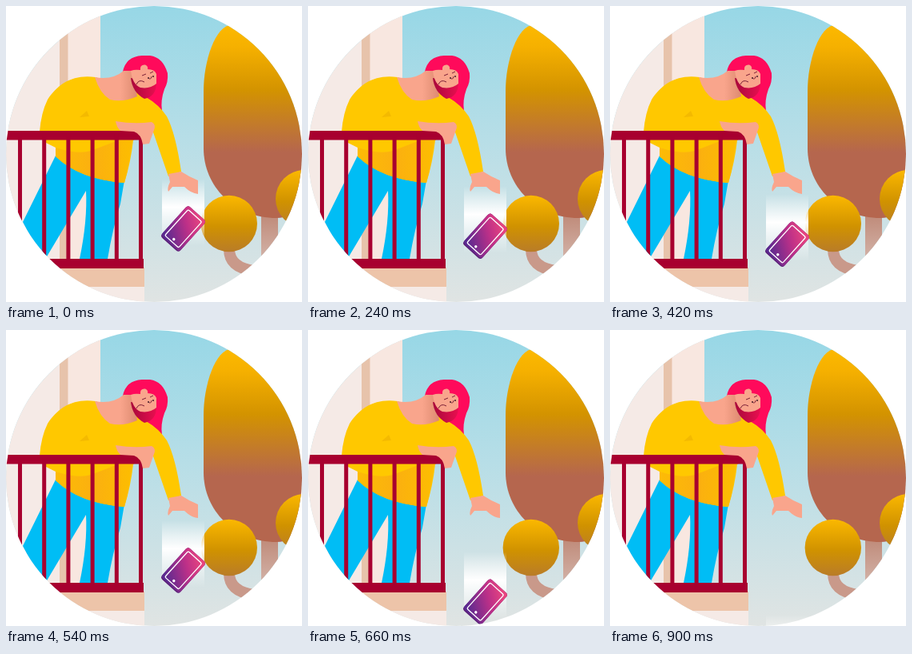
An HTML page for the animation above (2.25 s loop, 370 by 370 pixels).

```html
<!DOCTYPE html>
<html lang="en">
<head>
<meta charset="utf-8">
<title>Dropped phone</title>
<style>
html, body { margin: 0; width: 100%; height: 100%; overflow: hidden; background: #fff; }
svg { display: block; width: 100vw; height: 100vh; }
</style>
</head>
<body>
<svg viewBox="0 0 370 370">
  <defs>
    <clipPath id="disc"><circle cx="185" cy="185" r="185"/></clipPath>
    <linearGradient id="sky" x2="0" y2="1">
      <stop stop-color="#97d7e6"/><stop offset=".45" stop-color="#b7dee7"/><stop offset="1" stop-color="#e0e4e3"/>
    </linearGradient>
    <linearGradient id="crown" x2="0" y2="1">
      <stop stop-color="#fdb900"/><stop offset=".12" stop-color="#f5b000"/><stop offset=".34" stop-color="#d39300"/><stop offset=".66" stop-color="#b5664e"/>
    </linearGradient>
    <linearGradient id="bush" x2="0" y2="1">
      <stop stop-color="#fbb800"/><stop offset=".55" stop-color="#d09200"/><stop offset="1" stop-color="#b97c28"/>
    </linearGradient>
    <linearGradient id="trunk" x2="0" y2="1">
      <stop stop-color="#bd8674"/><stop offset="1" stop-color="#d8bdb4"/>
    </linearGradient>
    <linearGradient id="trail" x2="0" y2="1">
      <stop stop-color="#fff" stop-opacity="0"/><stop offset=".42" stop-color="#fff"/><stop offset="1" stop-color="#fff" stop-opacity="0"/>
    </linearGradient>
    <linearGradient id="screen" x1=".7" y1="0" x2=".3" y2="1">
      <stop stop-color="#e8457f"/><stop offset=".4" stop-color="#bd3088"/><stop offset="1" stop-color="#5a2a90"/>
    </linearGradient>
    <linearGradient id="hem">
      <stop stop-color="#fdbb05"/><stop offset=".5" stop-color="#fbb010"/><stop offset="1" stop-color="#fdbd00"/>
    </linearGradient>
    <linearGradient id="neck">
      <stop offset=".6" stop-color="#f9a58c"/><stop offset="1" stop-color="#dd8a70"/>
    </linearGradient>
    <linearGradient id="beard">
      <stop stop-color="#a8083a"/><stop offset="1" stop-color="#e80f50"/>
    </linearGradient>
  </defs>
  <g clip-path="url(#disc)">
    <path fill="url(#sky)" d="M0 0H370V370H0z"/>

    <!-- building -->
    <path fill="#f5eae6" d="M0 0H118V316H0zM0 351H173V370H0z"/>
    <path fill="#f8e7e0" d="M77 0H118V316H77z"/>
    <path fill="#e7c3ab" d="M67 0H77.500V316H67z"/>
    <path fill="#edc4a9" d="M0 327H173V351H0z"/>

    <!-- trees -->
    <path fill="url(#trunk)" d="M319 255H340V330H319z"/>
    <path fill="none" stroke="#c9998a" stroke-width="14" d="M279 304Q279 327 310 331"/>
    <path fill="url(#crown)" d="M247 106C247 70 261 24 283 23C302 23 326 55 343 84C360 113 371 150 371 190V250Q358 265 338 265C285 265 247 225 247 178z"/>
    <circle cx="373" cy="241" r="36" fill="url(#bush)"/>
    <circle cx="278.800" cy="272" r="35.200" fill="url(#bush)"/>

    <g id="fall">
      <path fill="url(#trail)" d="M195 -62H248V22H195z"/>
      <g transform="translate(221.500 .5) rotate(42)">
        <rect x="-15.500" y="-26" width="31" height="52" rx="4" fill="#5c1f78"/>
        <rect x="-15.500" y="-26" width="31" height="50.500" rx="4" fill="url(#screen)"/>
        <rect x="-11.500" y="-22" width="23" height="43.500" rx="2" fill="none" stroke="#fff" stroke-width="1.300"/>
        <circle cy="17.500" r="1.700" fill="#fff"/>
      </g>
    </g>

    <!-- person -->
    <path fill="#00bdf5" d="M62 187L21 270L47 320L100 231Q102 268 92 316H127Q133 280 143 247L148 218L100 190z"/>
    <path fill="#ff0a5b" d="M146 82Q150 63 170 62H180Q196 64 202 84Q203 95 198 104Q193 118 195 131L180 120L157 92z"/>
    <path fill="#ffc800" d="M112 89C84 85 65 97 52 117Q44 133 42 157L50 171L62 177V188Q92 217 148 221Q156 195 159 168L182 152L203 213L219 207Q212 159 201 138Q191 123 175 114L157 104z"/>
    <path fill="url(#hem)" d="M62 177Q90 186 106 181L140 168H158Q155 195 148 221Q92 217 62 188z"/>
    <path fill="url(#neck)" d="M111 89Q133 93 147 81H159L164 113Q146 121 130 117Q117 109 111 89z"/>
    <path fill="url(#beard)" d="M156 90Q158 108 173 116Q188 113 188 96z"/>
    <path fill="#f9a58c" d="M156 81Q161 79 168 80Q167 73 174 73.500Q178 75 177 79Q186 79 188 85V97Q180 104 168 102Q158 98 156 81z"/>
    <path fill="none" stroke="#7c2138" d="M163 98Q166 91 173 95M170 87L175 85M180 84L184 82M178 90Q181 93 182 88"/>
    <circle cx="178" cy="90" r="1" fill="#45202a"/>
    <circle cx="184" cy="88" r="1" fill="#45202a"/>
    <path fill="#f4ba00" d="M92 139L101 131L104 138z"/>
    <path fill="#f9a58c" d="M203 210L219 207Q228 213 240 218V235Q231 234 223 226L208 226L203 232Q201 228 205 220z"/>

    <!-- railing -->
    <g id="bars" fill="#a8002f"><path d="M0 156H172V167.500H0zM0 316H172V328H0z"/></g>
    <path fill="#f9a58c" d="M137 144Q160 148 182 145Q188 148 185 155L179 172L171 173Q169 160 160 157L143 156Q138 151 137 144z"/>
  </g>
</svg>
<script>
const fall = document.getElementById('fall');
const bars = document.getElementById('bars');
for (let i = 0; i < 6; i++) {
  const x = 15 + i * 30.2;
  bars.innerHTML += `<path d="M${x} 160h5v160h-5z"/>`;
}

// Eased drift, then a steady drop out of view.
function height(t) {
  if (t > 540) return 300 + 118 * (Math.min(t, 900) - 540) / 360;
  const p = t / 540;
  return 278 + 22 * p * p * (3 - 2 * p);
}

function draw(now) {
  const t = Math.floor(now % 2250 / 30) * 30;
  fall.setAttribute('transform', `translate(0 ${height(t)})`);
  requestAnimationFrame(draw);
}
draw(performance.now());
</script>
</body>
</html>
```
